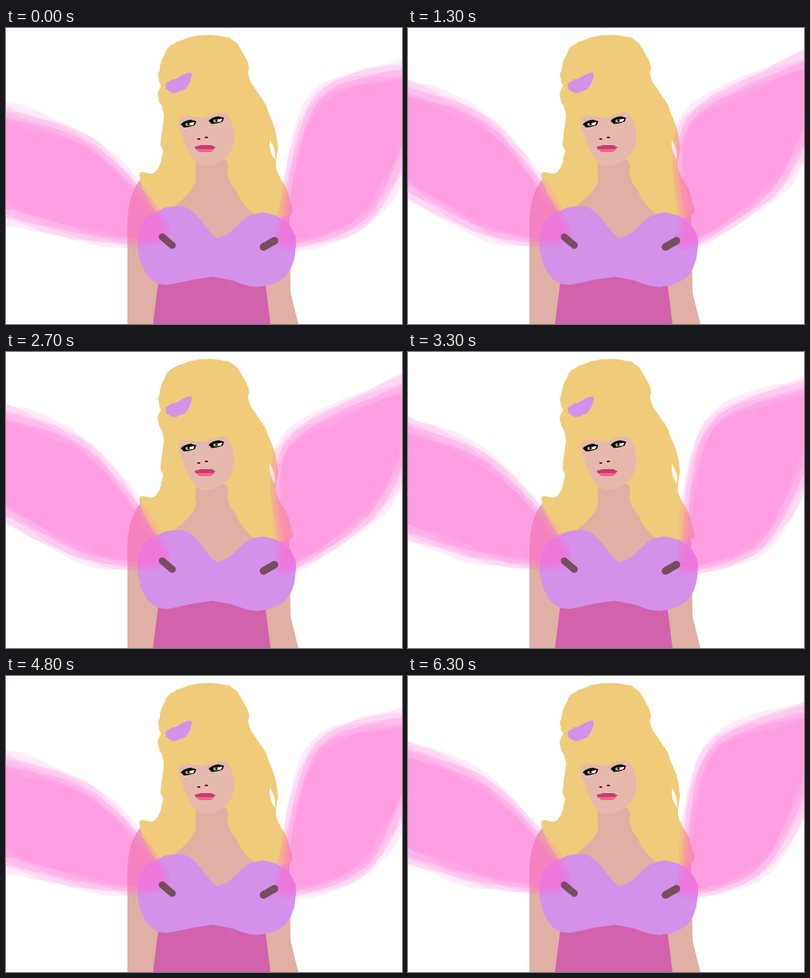
An HTML page with a canvas that plays this animation: 512 px wide and 384 px high, repeating every 6400 ms.

```html
<!DOCTYPE html>
<html lang="en">
<head>
<meta charset="utf-8">
<title>Fairy</title>
<style>
html, body { margin: 0; height: 100%; overflow: hidden; background: #fff; }
canvas { display: block; }
</style>
</head>
<body>
<canvas id="stage" width="512" height="384"></canvas>
<script>
const ctx = document.getElementById('stage').getContext('2d');
const STEP = 100, STEPS = 64, WASHES = 7;

// "x,y x,y ..." -> [[x, y], ...]
const points = text => text.split(' ').map(p => p.split(',').map(Number));
const mix = (a, b, t) => a.map((p, i) => p.map((v, k) => v + (b[i][k] - v) * t));

// Repeatable noise from -1 to 1
function noise(n) {
  const v = Math.sin(n * 127.1) * 43758.5;
  return (v - Math.floor(v)) * 2 - 1;
}

// Samples a Catmull-Rom curve through the key points
function curve(keys, closed, detail = 8) {
  const n = keys.length, samples = [];
  const at = i => keys[closed ? (i + n) % n : Math.max(0, Math.min(n - 1, i))];
  for (let i = 0; i < (closed ? n : n - 1); i++) {
    const [a, b, c, d] = [at(i - 1), at(i), at(i + 1), at(i + 2)];
    for (let j = 0; j < detail; j++) {
      const t = j / detail;
      samples.push(b.map((v, k) => v + t / 2 * (c[k] - a[k] +
        t * (2 * a[k] - 5 * v + 4 * c[k] - d[k] + t * (3 * (v - c[k]) + d[k] - a[k])))));
    }
  }
  if (!closed) samples.push(keys[n - 1]);
  return samples;
}

// Closed polygon whose edge is pushed outwards by offset(i)
function polygon(samples, offset) {
  const path = new Path2D(), last = samples.length - 1;
  samples.forEach(([x, y], i) => {
    const p = samples[Math.max(0, i - 1)], q = samples[Math.min(last, i + 1)];
    const dx = q[0] - p[0], dy = q[1] - p[1], push = offset(i) / (Math.hypot(dx, dy) || 1);
    path.lineTo(x + dy * push, y - dx * push);
  });
  path.closePath();
  return path;
}

const cutout = (text, rough, detail = 5) =>
  polygon(curve(points(text), true, detail), i => rough * noise(i + 1));

function fill(path, color) {
  ctx.fillStyle = color;
  ctx.fill(path instanceof Path2D ? path : new Path2D(path), 'evenodd');
}

function line(path, color, width) {
  ctx.strokeStyle = color;
  ctx.lineWidth = width;
  ctx.lineCap = 'round';
  ctx.stroke(new Path2D(path));
}

// Wings: tip and bulge on one side, the fixed root, bulge and tip on the other
const pose = (left, right) => {
  const [a, b, c, d] = points(left), [e, f, g, h] = points(right);
  return [[a, b, [199, 247], [190, 277], c, d], [e, f, [364, 282], [356, 250], g, h]];
};
const low = pose('-10,108 110,151 100,269 -10,236', '522,151 464,249 402,92 522,55');
const middle = pose('-10,92 105,142 90,264 -10,229', '522,140 458,250 390,96 522,42');
const high = pose('-10,76 105,125 100,264 -10,203', '522,132 470,214 363,118 522,38');
const blend = t => middle.map((wing, i) => mix(wing, high[i], t));

// Translucent washes of growing size with uneven edges, thinner at the root
function washes(keys, seed) {
  const samples = curve(keys, false), last = samples.length - 1;
  return Array.from({ length: WASHES }, (_, k) => {
    const spread = 14 - 26 * k / (WASHES - 1), phase = seed * 5 + k * 2.4;
    return polygon(samples, i => {
      const taper = 1 - .55 * Math.sin(Math.PI * i / last);
      return taper * (spread + 3 * Math.sin(i * .7 + phase) + 1.5 * noise(i + phase));
    });
  });
}

// Flap from low to high; the way back mirrors the way out
const flap = [low, middle, blend(.5), high, blend(1.15)]
  .map((wings, i) => wings.flatMap((keys, side) => washes(keys, i * 2 + side)));

const hair = cutout('172,191 192,188 203,163 200,148 204,115 196,86 200,76 197,60 208,28 232,14 262,9 ' +
  '294,16 313,47 314,66 336,100 351,148 349,180 366,218 367,243 320,241 297,211 287,193 284,172 ' +
  '247,174 245,202 222,228 196,240', .8);
const face = cutout('224,117 254,116 285,111 295,142 286,166 262,179 246,174 231,149', .4);
const bodice = cutout('172,296 177,251 212,232 240,237 268,269 285,268 318,242 350,244 374,270 ' +
  '365,318 325,336 268,323 198,332', .6);
const bow = cutout('206,75 220,66 236,57 238,70 220,84', 2, 4);

function drawBody() {
  fill('M157 384V252Q158 215 174 196L240 165H290L366 235L368 344L378 384Z', '#e0b0a4');
  fill(hair, '#f0cb7a');
  fill('M341 145Q349 155 348 171Q340 162 341 145Z', '#fff');
  fill(face, '#e6b9ae');
  fill('M198 320L190 384H342L334 320Z', '#d262ab');
  fill(bodice, '#d391ea');
  fill(bow, '#d391ea');
  fill('M247 143h4v2h-3ZM257 141h4v2h-4Z', '#6b0f24');
  fill('M244 154L252 152H266L271 155L268 157H245Z', '#c83a6b');
  fill('M245 157H270L265 161H250Z', '#ee6690');
}

function drawEye(x, y, closed) {
  ctx.save();
  ctx.translate(x, y);
  fill('M-10 1Q-6 -4 3 -5L10 -3L8 2Q0 5 -6 5Z', '#000');
  if (closed) {
    fill('M-9 1Q-4 -5 9 -4L7 0L-6 3Z', '#3cd3dc');
  } else {
    fill('M-4 0L8 -2L6 2L-3 3Z', '#f4eee8');
    fill('M-3 -1h5v4h-4Z', '#7d9a45');
    fill('M-1 -1h2v3h-2Z', '#101808');
  }
  ctx.restore();
}

function draw(time) {
  const step = Math.floor(time / STEP) % STEPS, phase = step % 8;
  const blink = Math.abs(step % 32 - 21) <= 1;
  ctx.clearRect(0, 0, 512, 384);
  drawBody();
  drawEye(236, 124, blink);
  drawEye(272, 119.5, blink);
  for (const wash of flap[Math.min(phase, 8 - phase)]) fill(wash, 'rgba(250,102,205,.129)');
  line('M202 271L215 282', '#754e5e', 9);
  line('M333 284L347 276', '#754e5e', 10);
}

const start = performance.now();
function tick() {
  draw(performance.now() - start);
  requestAnimationFrame(tick);
}
tick();
</script>
</body>
</html>
```
